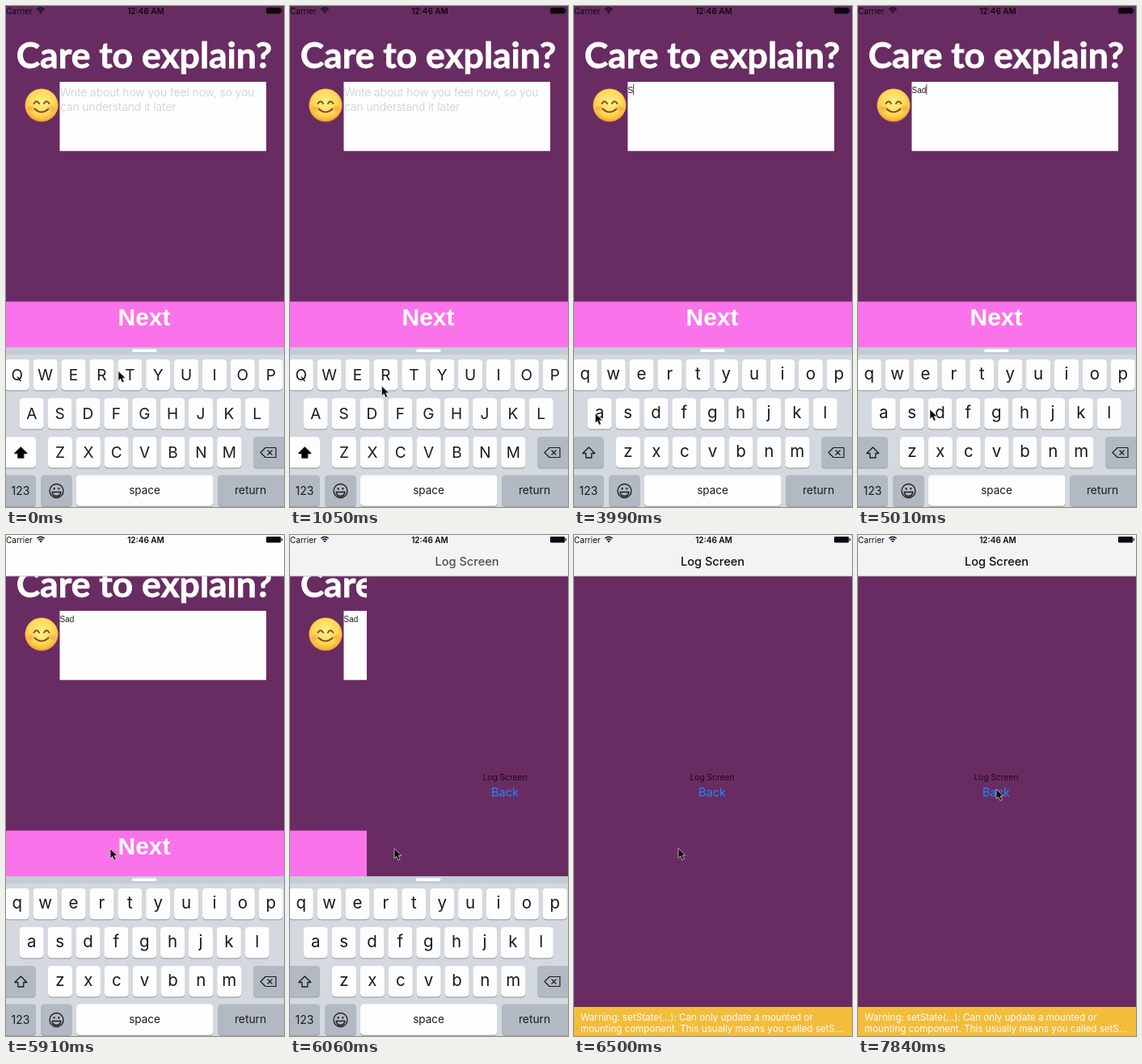
These frames come from a looping animation (344 px wide and 621 px high, 7.99 s). An HTML page:

```html
<!DOCTYPE html>
<html lang="en">
<head>
<meta charset="utf-8">
<title>Care to explain?</title>
<style>
  html, body { margin: 0; width: 100%; height: 100%; overflow: hidden; background: #692c62; }
  svg { display: block; width: 344px; height: 621px; font-family: Inter, "Liberation Sans", sans-serif; }
  .title { font: bold 44.5px Lato, "Open Sans", sans-serif; stroke: #fff; stroke-width: .8; }
  .next { font: bold 30px "Liberation Sans", Arial, sans-serif; }
  .note { font: 10px "Liberation Sans", Arial, sans-serif; }
  .mid { text-anchor: middle; }
  #keyboard { --board: #d4d9df; --strip: #c5ccd4; --dark: #b2b9c3; }
  #keyboard.tinted { --board: #d0ced8; --strip: #c3bfcc; --dark: #b2adbd; }
</style>
</head>
<body>
<svg id="stage" viewBox="0 0 344 621">
  <defs>
    <radialGradient id="face" cx=".5" cy=".42" r=".58">
      <stop offset="0" stop-color="#fff08a"/>
      <stop offset=".65" stop-color="#fed858"/>
      <stop offset=".88" stop-color="#f8b93c"/>
      <stop offset="1" stop-color="#e4922c"/>
    </radialGradient>
    <radialGradient id="blush">
      <stop offset="0" stop-color="#f58a3c" stop-opacity=".6"/>
      <stop offset="1" stop-color="#f58a3c" stop-opacity="0"/>
    </radialGradient>
  </defs>

  <g id="form">
    <rect width="344" height="621" fill="#692c62"/>
    <text class="title mid" x="171" y="76.5" fill="#fff">Care to explain?</text>
    <rect x="66.5" y="94" width="255.5" height="85.7" fill="#fefefe"/>
    <g id="hint" font-size="13.8" font-weight="300" fill="#cbcbd0">
      <text x="67" y="112">Write about how you feel now, so you</text>
      <text x="67" y="129.5">can understand it later</text>
    </g>
    <text id="typed" class="note" x="66.5" y="108" fill="#222"></text>
    <path id="caret" d="M0 97v13" stroke="#8d4270" stroke-width="1.2"/>
    <g transform="translate(44 123)">
      <circle r="20.5" fill="url(#face)"/>
      <ellipse cx="-13" cy="4" rx="6" ry="5" fill="url(#blush)"/>
      <ellipse cx="13" cy="4" rx="6" ry="5" fill="url(#blush)"/>
      <g fill="none" stroke="#80501c" stroke-width="1.9" stroke-linecap="round">
        <path d="M-9.5-2q3.3-5.5 6.6 0M2.9-2q3.3-5.5 6.6 0M-8.5 4.5q8.5 8 17 0"/>
      </g>
    </g>
    <rect y="366.4" width="344" height="57" fill="#fa73ea"/>
    <text class="next mid" x="171" y="396" fill="#fff">Next</text>
  </g>

  <g id="log">
    <rect y="51" width="344" height="570" fill="#692c62"/>
    <text class="mid" x="171" y="304" font-size="10.2" fill="#150a14">Log Screen</text>
    <text class="mid" x="171" y="324" font-size="14.5" fill="#2088fb">Back</text>
  </g>

  <g id="nav">
    <rect id="bar" width="344" height="51"/>
    <path d="M0 51h344" stroke="#b9a9b8" stroke-width=".8"/>
    <text id="heading" class="mid" y="38" font-size="14.6" font-weight="500" fill="#111">Log Screen</text>
  </g>

  <g fill="#0d080d">
    <text x="0" y="10" font-size="10">Carrier</text>
    <text class="mid" x="173" y="10" font-size="10" font-weight="600">12:46 AM</text>
    <g fill="none" stroke="#0d080d" stroke-width="1.4">
      <path d="M38.3 4.2q4.7-4 9.4 0M40.2 6.2q2.8-2.4 5.6 0"/>
    </g>
    <path d="M41.4 7.5q1.6-1.3 3.2 0l-1.6 2z"/>
    <rect x="322" y="2" width="18" height="7.5" rx="1"/>
    <rect x="340.6" y="4" width="1.4" height="3.5" rx=".7"/>
  </g>

  <g id="keyboard"></g>

  <g id="warning">
    <rect y="585" width="344" height="36" fill="#f4bc3b"/>
    <g font-size="11.6" fill="#fff">
      <text x="8" y="602">Warning: setState(...): Can only update a mounted or</text>
      <text x="8" y="616">mounting component. This usually means you called setS...</text>
    </g>
  </g>

  <path id="pointer" d="M0 0v12l2.8-2.4 2 4.7 2.4-1-2-4.6h3.8z" fill="#0a0a0a" stroke="#e6dfe6" stroke-width=".7"/>
</svg>

<script>
const $ = id => document.getElementById(id);
const keyboard = $("keyboard");

function add(tag, attrs, text) {
  const node = document.createElementNS("http://www.w3.org/2000/svg", tag);
  for (const name in attrs) node.setAttribute(name, attrs[name]);
  if (text) node.textContent = text;
  return keyboard.appendChild(node);
}

function addKey(x, y, w, fill) {
  add("rect", { x, y: y + 1, width: w, height: 38.5, rx: 4.5, fill: "#a0a4ab" });
  return add("rect", { x, y, width: w, height: 38.3, rx: 4.5, style: `fill:${fill}` });
}

const label = (x, y, size, text) =>
  add("text", { x, y, class: "mid", "font-size": size, fill: "#1a1a1a" }, text);

const line = (d, width = 1.4) =>
  add("path", { d, fill: "none", stroke: "#1b1b1f", "stroke-width": width, "stroke-linejoin": "round" });

const white = "#fdfdfe", dark = "var(--dark)";
const letters = [];

add("rect", { y: 423, width: 344, height: 198, style: "fill:var(--board)" });
add("rect", { y: 423, width: 344, height: 9, style: "fill:var(--strip)" });
add("rect", { x: 156, y: 425.5, width: 30.5, height: 3.5, rx: 1.7, fill: "#fff" });

[["qwertyuiop", 13.8, 438], ["asdfghjkl", 31.7, 486], ["zxcvbnm", 67, 534]].forEach(([row, left, y]) => {
  [...row].forEach((char, i) => {
    const x = left + 34.88 * i;
    addKey(x - 15, y, 30, white);
    letters.push({ char, y, node: label(x, y, 20, char) });
  });
});

const shiftKey = addKey(-3, 534, 40, dark);
const shiftIcon = line("M18.3 547l7.5 7.5h-4v5.5h-7v-5.5h-4z", 1.3);
addKey(306, 534, 41, dark);
line("M321 547.5h13v12h-13l-6-6zM323.5 550.5l6 6m0-6l-6 6", 1.2);
addKey(-3, 581.5, 40, dark);
label(18, 606, 14, "123");
addKey(43, 581.5, 39, dark);
line("M54 601a8.5 8.5 0 1 0 17 0a8.5 8.5 0 1 0-17 0M57 602.5h11q-1 5-5.5 5t-5.5-5z", 1.3);
line("M59.6 597v2.5M65.4 597v2.5", 1.8);
addKey(87, 581.5, 169.5, white);
label(171.5, 605, 13.5, "space");
addKey(262, 581.5, 85, dark);
label(302.5, 605, 13.8, "return");

// Each track: [step, value, ...]; one step lasts STEP ms.
const LOOP = 7990, STEP = 148, LAST = 53;
const path = [
  [0, 139, 452.5], [4, 139, 452.5], [12, 71, 502], [24, 71, 502], [27, 26.3, 505], [31, 26.3, 505],
  [34, 89, 500], [35, 89, 500], [39, 129, 389], [47, 129, 388], [51, 171, 315]
];
const drop = [[41, 0], [42, 38], [43, 145], [44, 200]];
const slide = [[40, 344], [41, 95], [42, 0]];
const words = [[0, ""], [24, "S"], [31, "Sa"], [34, "Sad"]];
const caretAt = { S: 73.6, Sa: 79.2, Sad: 84.8 };

function at(track, step) {
  const next = track.findIndex(k => k[0] > step);
  if (next === 0) return track[0].slice(1);
  if (next < 0) return track[track.length - 1].slice(1);
  const a = track[next - 1], b = track[next];
  const p = (step - a[0]) / (b[0] - a[0]);
  return a.slice(1).map((v, i) => v + (b[i + 1] - v) * p);
}

const show = (id, on) => $(id).setAttribute("visibility", on ? "visible" : "hidden");
const move = (id, x, y) => $(id).setAttribute("transform", `translate(${x} ${y})`);

function setShift(on) {
  for (const { char, y, node } of letters) {
    node.textContent = on ? char.toUpperCase() : char;
    node.setAttribute("font-size", on ? 19 : 20.5);
    node.setAttribute("y", y + (on ? 26.3 : 25));
  }
  shiftKey.style.fill = on ? white : dark;
  shiftIcon.setAttribute("fill", on ? "#000" : "none");
}

function draw(step) {
  const word = words.filter(w => w[0] <= step).pop()[1];
  const [x, y] = at(path, step);
  const [side] = at(slide, step);
  move("pointer", x, y);
  move("log", side, 0);
  move("keyboard", 0, at(drop, step)[0]);
  keyboard.classList.toggle("tinted", step >= 42);
  setShift(!word);

  $("typed").textContent = word;
  show("hint", !word);
  show("caret", word && step < 40);
  move("caret", caretAt[word] || 0, 0);

  show("log", step > 40);
  show("nav", step >= 40);
  show("warning", step >= 44);
  $("bar").setAttribute("fill", step > 40 ? "#f3f3f5" : "#fdfdfd");
  $("heading").setAttribute("x", 171.5 + side / 2);
  $("heading").setAttribute("opacity", 1 - side / 344);
}

let start, shown = -1;
function tick(now) {
  start ??= now;
  const step = Math.min(LAST, Math.floor(((now - start) % LOOP + 24) / STEP));
  if (step !== shown) draw(shown = step);
  requestAnimationFrame(tick);
}
draw(0);
requestAnimationFrame(tick);
</script>
</body>
</html>
```
